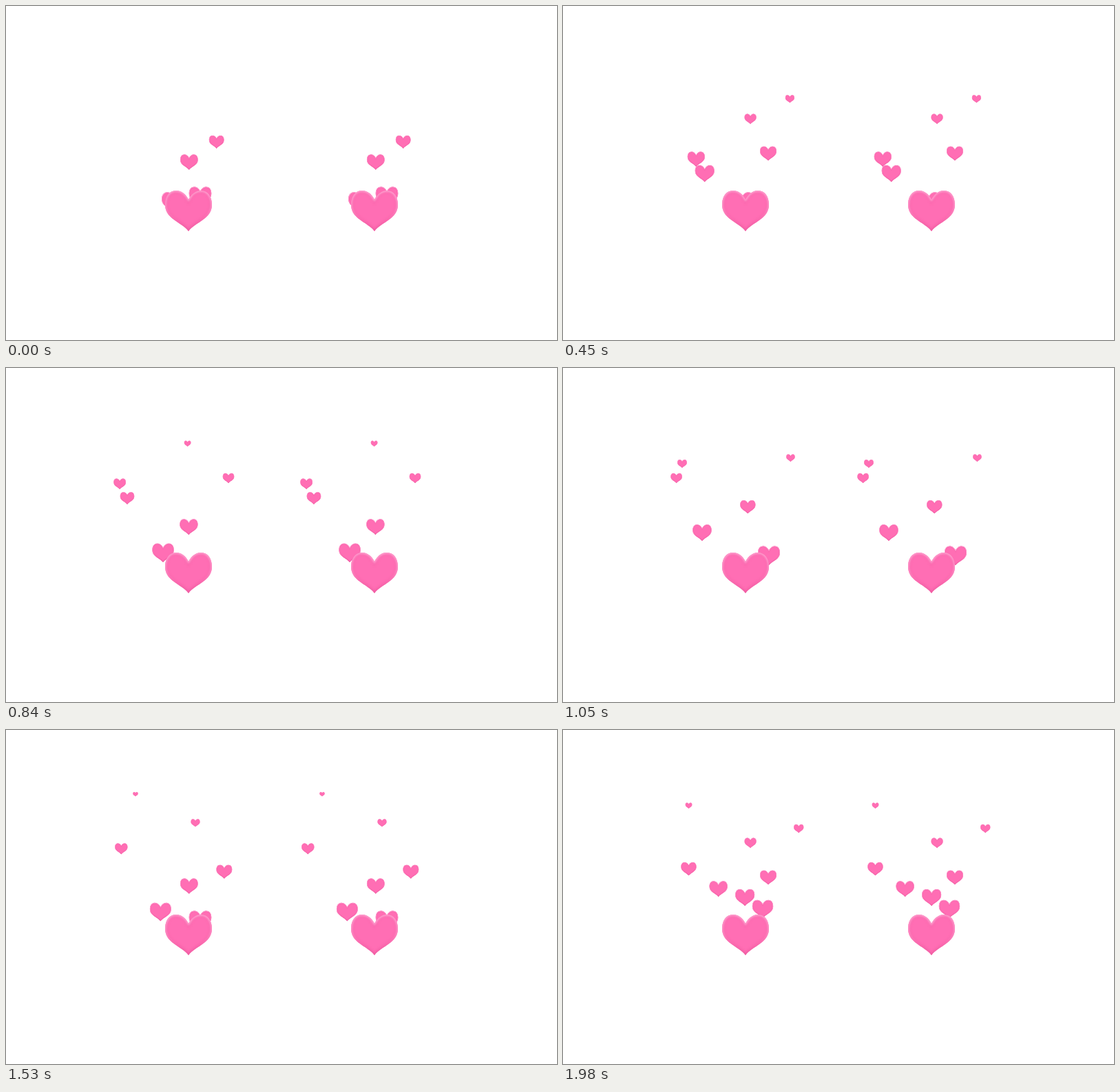
Write an HTML page that moves like this. It is 800 by 485 pixels and loops after 2010 ms.

```html
<!DOCTYPE html>
<html lang="en">
<head>
<meta charset="utf-8">
<title>Rising hearts</title>
<style>
  html, body { margin: 0; width: 100%; height: 100%; overflow: hidden; background: #fff; }
  svg { display: block; }
</style>
</head>
<body>
<svg width="800" height="485" viewBox="0 0 800 485">
  <defs>
    <path id="outline" d="M0-16.5C4-24 10-29.5 18-29.5C28-29.5 34-21 34-9C34 12 10 16 0 29.5C-10 16-34 12-34-9C-34-21-28-29.5-18-29.5C-10-29.5-4-24 0-16.5Z"/>
    <clipPath id="inside"><use href="#outline"/></clipPath>
    <filter id="soft" x="-20%" y="-20%" width="140%" height="140%"><feGaussianBlur stdDeviation="1.5"/></filter>
    <linearGradient id="rim" x1="0" y1="0" x2="0" y2="1">
      <stop offset="0" stop-color="#ffb0d8"/>
      <stop offset=".45" stop-color="#ff98ca"/>
      <stop offset=".75" stop-color="#f968ac"/>
      <stop offset="1" stop-color="#ec5a9f"/>
    </linearGradient>
    <g id="heart">
      <use href="#outline" fill="#ff6eb4"/>
      <g clip-path="url(#inside)" fill="none" filter="none">
        <use href="#outline" stroke="#f560a8" stroke-width="7" opacity=".5" filter="url(#soft)"/>
        <use href="#outline" stroke="url(#rim)" stroke-width="3" filter="url(#soft)"/>
      </g>
    </g>
  </defs>
  <g id="flock"></g>
  <use href="#heart" transform="translate(265 297.5)"/>
  <use href="#heart" transform="translate(535 297.5)"/>
</svg>
<script>
const STEP = 30, STEPS = 67, LIFE = 46;
const START_Y = 285, RISE = 4.17, SIDE_GAP = 271;

// Each lane bends at a few [age, x] points; births are in steps, shift moves a heart sideways.
const lanes = [
  { bends: [[0, 243], [11, 202], [29, 163], [35, 173], [46, 188]],
    births: [0, 5, 24, 46] },
  { bends: [[0, 260], [36, 275], [46, 256]],
    births: [-14, 15, 37, 56] },
  { bends: [[0, 278], [8, 294], [17, 298], [30, 323], [46, 340]],
    births: [-21, -2, 49, 60] }
];
const [left, , right] = lanes;
const strays = [
  { bends: left.bends, births: [53], shift: 28 },
  { bends: right.bends, births: [32], shift: 15 }
];

function xAt(bends, age) {
  const next = Math.max(1, bends.findIndex(([a]) => a >= age));
  const [a0, x0] = bends[next - 1], [a1, x1] = bends[next];
  return x0 + (x1 - x0) * (age - a0) / (a1 - a0);
}

const flock = document.getElementById("flock");
const hearts = [...lanes, ...strays].flatMap(({ bends, births, shift = 0 }) =>
  births.flatMap(birth => [0, SIDE_GAP].map(side => {
    const node = document.createElementNS("http://www.w3.org/2000/svg", "use");
    node.setAttribute("href", "#heart");
    flock.append(node);
    return { node, bends, birth, offset: side + shift };
  })));

function draw(time) {
  const step = Math.floor(time / STEP) % STEPS;
  for (const { node, bends, birth, offset } of hearts) {
    const age = step - birth;
    const alive = age >= 0 && age <= LIFE;
    node.setAttribute("visibility", alive ? "visible" : "hidden");
    if (!alive) continue;
    const x = xAt(bends, age) + offset;
    const y = START_Y - RISE * age;
    const scale = 0.497 - 0.0084 * age;
    node.setAttribute("transform", `translate(${x} ${y}) scale(${scale})`);
  }
}

const begin = performance.now();
function tick() {
  draw(performance.now() - begin);
  requestAnimationFrame(tick);
}
tick();
</script>
</body>
</html>
```
